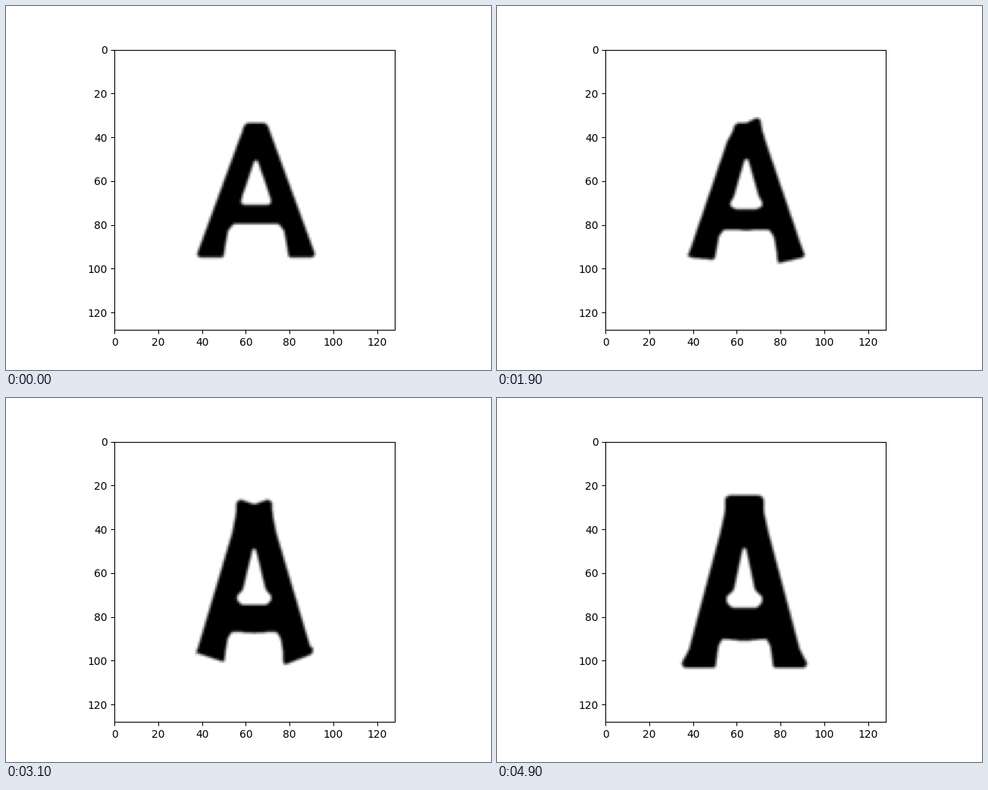
Write a matplotlib script that moves like this. It is 640 by 480 pixels and loops after 5 s.

```python
import numpy as np
import matplotlib.pyplot as plt
from matplotlib.animation import FuncAnimation
from matplotlib.path import Path

CELLS = 128                      # image resolution
SUB = 3                          # samples per cell
ORIGIN = np.array([142.7, 56.8])   # stage position of the image corner
CELL = 2.8875                    # stage pixels per cell
SOFTNESS = 0.7                   # edge blur in cells
CONTRAST = 1.25
FRAMES, INTERVAL = 50, 100

# Spans in ms during which a part moves from its first to its last place.
BODY = (600, 4600)
HOLE = (0, 4600)
TOP_LEFT, TOP_MID, TOP_RIGHT = (1900, 3600), (1900, 4200), (700, 4100)
SOLE_LEFT, SOLE_RIGHT = (1200, 4200), (700, 3800)
HEEL_LEFT, HEEL_RIGHT = (2900, 3600), (2700, 3900)
TIP_LEFT, TIP_RIGHT = (2500, 3150), (3000, 3800)

# The letter is mirrored about an axis, so each key point is
# (first half-width, y), (last half-width, y), left span, right span.
AXIS = (329.5, 326)
OUTLINE = [
    ((0, 154), (0, 128), TOP_MID, TOP_MID),
    ((12, 154), (20, 128), TOP_LEFT, TOP_RIGHT),
    ((16, 158), (25, 131), TOP_LEFT, TOP_RIGHT),
    ((18, 165), (26, 151), TOP_LEFT, TOP_RIGHT),
    ((23, 178), (32, 178), BODY, BODY),
    ((76, 322), (73, 331), BODY, BODY),
    ((78, 328), (83, 350), TIP_LEFT, TIP_RIGHT),
    ((75, 331), (80, 355), HEEL_LEFT, HEEL_RIGHT),
    ((43, 331), (38, 355), SOLE_LEFT, SOLE_RIGHT),
    ((41, 318), (36, 338), BODY, BODY),
    ((37, 296), (34, 326), BODY, BODY),
    ((30, 287), (29, 317), BODY, BODY),
    ((0, 287), (0, 320), BODY, BODY),
]
COUNTER = [
    ((2, 203), (2, 197), HOLE, HOLE),
    ((18, 250), (14, 253), HOLE, HOLE),
    ((20, 257), (23, 261), HOLE, HOLE),
    ((19, 261), (24, 268), HOLE, HOLE),
    ((13, 262), (17, 276), HOLE, HOLE),
]

# Sample grid and a matrix that blurs and reduces it to cells in one step.
fine = (np.arange(CELLS * SUB) + 0.5) / SUB
grid = np.stack(np.meshgrid(fine, fine), axis=-1).reshape(-1, 2)
centres = np.arange(CELLS) + 0.5
blur = np.exp(-((centres[:, None] - fine) / SOFTNESS) ** 2 / 2)
blur /= blur.sum(axis=1, keepdims=True)


def ease(time, span):
    u = np.clip((time - span[0]) / (span[1] - span[0]), 0, 1)
    return u * u * (3 - 2 * u)


def mix(first, last, k):
    first, last = np.array(first, float), np.array(last, float)
    return first + k * (last - first)


def inside(key_points, time):
    """Mask of the mirrored contour at the given time."""
    axis = mix(*AXIS, ease(time, BODY))
    left, right = [], []
    for first, last, left_span, right_span in key_points:
        width, y = mix(first, last, ease(time, left_span))
        left.append((axis - width, y))
        width, y = mix(first, last, ease(time, right_span))
        right.append((axis + width, y))
    contour = (np.array(right + left[::-1] + right[:1]) - ORIGIN) / CELL
    return Path(contour).contains_points(grid).reshape(CELLS * SUB, -1)


def letter(time):
    mask = inside(OUTLINE, time) & ~inside(COUNTER, time)
    ink = blur @ mask.astype(float) @ blur.T
    return 1 - np.clip((ink - 0.5) * CONTRAST + 0.5, 0, 1)


fig, ax = plt.subplots(figsize=(6.4, 4.8), dpi=100)
image = ax.imshow(letter(0), cmap="gray", vmin=0, vmax=1,
                  extent=(0, CELLS, CELLS, 0))


def update(frame):
    image.set_data(letter(frame * INTERVAL))
    return [image]


animation = FuncAnimation(fig, update, frames=FRAMES, interval=INTERVAL,
                          repeat=True, repeat_delay=0)
plt.show()
```
